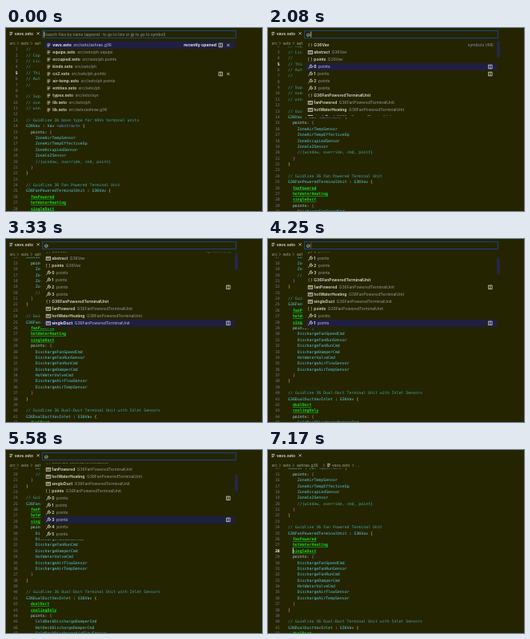
An HTML page that plays this animation: 320 by 229 pixels, repeating every 7330 ms.

```html
<!DOCTYPE html>
<html lang="en">
<head>
<meta charset="utf-8">
<title>Go to symbol</title>
<style>
  html, body { margin: 0; width: 100%; height: 100%; overflow: hidden; background: #242400; }
  svg { display: block; width: 320px; height: 229px; }
  text { white-space: pre; font: 5px Inter, "Open Sans", sans-serif; fill: #dbdbd4; }
  .code text { font: 4.9px "DejaVu Sans Mono", monospace; }
  .code .num { fill: #74748a; text-anchor: end; }
  .code .num.on { fill: #fff; font-weight: bold; }
  .comment { fill: #45a2aa; }
  .type { fill: #55c8dc; }
  .marker { fill: #12df24; font-weight: bold; text-decoration: underline; }
  .key { fill: #a8dcf4; }
  .mod { fill: #5c92e8; }
  .b1 { fill: #f2d51c; }
  .b2 { fill: #d870d6; }
  .crumb { fill: #a3a398; }
  .name { font-weight: 600; }
  .desc { fill: #9898a4; }
  .sel text { fill: #fff; }
  .sel .desc { fill: #c4c4d6; }
  .label { font-size: 5.2px; fill: #9292aa; text-anchor: end; }
  .sel .label { font-weight: 600; }
  .hint { font-size: 4.9px; fill: #9a9a90; }
  .line { fill: none; stroke: #d2d2c8; stroke-width: .8; }
  .chevron { fill: none; stroke: #a3a398; stroke-width: .6; }
</style>
</head>
<body>
<svg id="stage" viewBox="0 0 320 229">
  <defs>
    <clipPath id="codeClip"><path d="M0 22.8H320V229H0z"/></clipPath>
    <clipPath id="listClip"><path d="M46 16.5H290V110H46z"/></clipPath>
  </defs>
  <rect width="320" height="229" fill="#242400"/>
  <g clip-path="url(#codeClip)"><g id="code" class="code"></g></g>
  <g id="tabs"></g>
  <g id="picker">
    <rect id="panel" x="43.2" y="0" width="247" fill="#242400"/>
    <rect x="45.5" y="3.5" width="242" height="9" fill="none" stroke="#1450a0" stroke-width=".8"/>
    <text id="query" x="48" y="9.8"></text>
    <rect id="caret" y="4.5" width=".7" height="7" fill="#eee"/>
    <g clip-path="url(#listClip)"><g id="files"></g><g id="symbols"></g></g>
    <rect id="thumb" x="286" width="4" fill="#26264a"/>
  </g>
</svg>
<script>
const LOOP = 7330, LINE = 7.385, CHAR = 2.95, ROW = 9, FIRST = 21.5, MOUSE = 58;
const LIST_TOP = 16.5, LIST_HEIGHT = 93.5, TOTAL_SYMBOLS = 48;
const $ = id => document.getElementById(id);

function add(parent, tag, attrs = {}, text) {
  const el = document.createElementNS("http://www.w3.org/2000/svg", tag);
  for (const k in attrs) el.setAttribute(k, attrs[k]);
  if (text !== undefined) el.textContent = text;
  parent.appendChild(el);
  return el;
}
const show = (el, on) => { el.style.display = on ? "" : "none"; };

// Editor
const source = `//
// Copyright (c) 2024
// Licensed under the Academic Free License
//
// This file:
// Authors
//

// Supports
// overrides
// windows

// Guidline 36 base type for VAVs terminal units
G36Vav : Vav <abstract> {
  points: {
    ZoneAirTempSensor
    ZoneAirTempEffectiveSp
    ZoneOccupiedSensor
    ZoneCo2Sensor
    //{window, override, cmd, point}
  }
}

// Guidline 36 Fan Powered Terminal Unit
G36FanPoweredTerminalUnit : G36Vav {
  fanPowered
  hotWaterHeating
  singleDuct
  points: {
    DischargeFanSpeedCmd
    DischargeFanRunSensor
    DischargeFanRunCmd
    DischargeDamperCmd
    HotWaterValveCmd
    DischargeAirFlowSensor
    DischargeAirTempSensor
  }
}

// Guidline 36 Dual-Duct Terminal Unit with Inlet Sensors
G36DualDuctVavInlet : G36Vav {
  dualDuct
  coolingOnly
  points: {
    ColdDeckDischargeDamperCmd
    HotDeckDischargeDamperCmd
    ColdDeckDischargeAirFlowSensor
    HotDeckDischargeAirFlowSensor
  }
}`.split("\n");

function kind(token, indent) {
  if (token.startsWith("//")) return "comment";
  if (/^[{}]/.test(token)) return indent ? "b2" : "b1";
  if (token[0] === "<") return "mod";
  if (/^[A-Z]/.test(token)) return "type";
  if (token === "points") return "key";
  return /^[a-z]/.test(token) ? "marker" : "";
}

const nums = source.map((line, i) => {
  const y = 28.2 + i * LINE, indent = line.search(/\S|$/);
  const el = add($("code"), "text", { x: 25 + indent * CHAR, y });
  for (const token of line.trim().match(/\/\/.*|<\w+>|\w+|[^\w]/g) || [])
    add(el, "tspan", { class: kind(token, indent) }, token);
  return add($("code"), "text", { x: 14.8, y, class: "num" }, i + 1);
});
const cursor = add($("code"), "rect",
  { x: 30.8, y: 22.7 + 27 * LINE, width: 1, height: 7.2, fill: "#d8d8d0" });

const centred = line => Math.max(0, (line - 1) * LINE - 99.6);

// Tab and breadcrumb
function fileIcon(parent, x, y) {
  add(parent, "path", { class: "line",
    d: `M${x} ${y - 1.6}h3.8M${x} ${y}h3.8M${x} ${y + 1.6}h2.6` });
}
fileIcon($("tabs"), 4.5, 7);
add($("tabs"), "text", { x: 10.7, y: 8.9, class: "name" }, "vavs.xeto");
add($("tabs"), "path", { class: "line", d: "M38.7 5.3l3 3m0-3l-3 3" });
for (const [x, word] of [[4.5, "src"], [18.5, "xeto"], [36, "ashrae.g36"], [80, "vavs.xeto"], [110, "…"]])
  add($("tabs"), "text", { x, y: 20.8, class: "crumb" }, word);
for (const x of [14, 31, 69, 105.5])
  add($("tabs"), "path", { class: "chevron", d: `M${x} 17.4l1.6 1.7l-1.6 1.7` });
fileIcon($("tabs"), 74, 19);

// Picker rows
const glyph = s => g => add(g, "text", { x: 50, y: 1.7 }, s);
const icons = {
  file: g => fileIcon(g, 51.5, 0),
  object: glyph("{ }"),
  array: glyph("[ ]"),
  marker(g) {
    add(g, "rect", { class: "line", x: 50.2, y: -2, width: 5.4, height: 4 });
    add(g, "path", { class: "line", d: "M51.2 .6h1.2M53.2 .6h1.2M51.2 -.7h3.2" });
  },
  prop(g) {
    add(g, "path", { class: "line", d: "M50.2 2.6L53 -.2M54.4 -2.5a1.8 1.8 0 1 0 1.4 1.8l-1.4 .4l-.7 -.9z" });
  }
};

function makeRow(list, item, i, label) {
  const g = add(list, "g", { transform: `translate(0 ${FIRST + i * ROW})` });
  const back = add(g, "rect", { x: 48, y: -4.5, width: 238, height: ROW, fill: "#1f1f42" });
  icons[item.icon](g);
  const text = add(g, "text", { x: item.icon === "file" ? 58.3 : 57.3, y: 1.8 });
  add(text, "tspan", { class: "name" }, item.name);
  add(text, "tspan", { class: "desc", dx: 2.5 }, item.desc || "");
  const tag = label && add(g, "text", { y: 1.8, class: "label" }, label);
  const tools = add(g, "g");
  const isFile = item.icon === "file", x = isFile ? 266 : 275.5;
  add(tools, "path", { class: "line", d: `M${x} -2.3h4.6v4.6h-4.6zm2.3 0v4.6` });
  if (isFile) add(tools, "path", { class: "line", d: "M276.2 -1.6l3.2 3.2m0-3.2l-3.2 3.2" });
  return (selected, hovered) => {
    g.setAttribute("class", selected ? "sel" : "");
    show(back, selected);
    show(tools, selected || hovered);
    if (tag) tag.setAttribute("x", selected || hovered ? (isFile ? 263 : 272) : 282);
  };
}

const files = ["vavs ashrae.g36", "equips ph.equips", "occupied ph.points", "kinds ph",
  "co2 ph.points", "air-temp ph.points", "entities ph", "types sys", "lib ph", "lib ashrae.g36"]
  .map(s => {
    const [name, dir] = s.split(" ");
    return { icon: "file", name: name + ".xeto", desc: "src/xeto/" + dir };
  });

const symbols = [];
function addType(name, line, markers, markerLine, pointLine, count) {
  symbols.push({ icon: "object", name, line });
  markers.forEach((m, i) =>
    symbols.push({ icon: "marker", name: m, desc: name, line: markerLine + i }));
  symbols.push({ icon: "array", name: "points", desc: name, line: pointLine });
  for (let i = 0; i < count; i++)
    symbols.push({ icon: "prop", name: String(i), desc: "points", line: pointLine + 1 + i });
}
addType("G36Vav", 14, ["abstract"], 14, 15, 4);
addType("G36FanPoweredTerminalUnit", 25, ["fanPowered", "hotWaterHeating", "singleDuct"], 26, 29, 7);

const fileRows = files.map((f, i) => makeRow($("files"), f, i, i ? "" : "recently opened"));
const symbolRows = symbols.map((s, i) =>
  makeRow($("symbols"), s, i, i ? "" : `symbols (${TOTAL_SYMBOLS})`));

function paintRows(rows, selected, scroll) {
  const hovered = Math.round((MOUSE + scroll - FIRST) / ROW);
  rows.forEach((paint, i) => paint(i === selected, i === hovered));
}

const shown = LIST_HEIGHT / (TOTAL_SYMBOLS * ROW);
$("thumb").setAttribute("height", LIST_HEIGHT * shown);

// Key presses: down to row 17, then back up to row 10
const TYPED = 500, LISTED = 580, CLOSED = 7000;
const downs = [1670, 1830, 2000, 2250, 2420, 2670, 2830, 3000, 3080, 3250,
  3750, 3920, 4170, 4330, 4580, 4830, 5000];
const ups = [5420, 5580, 5750, 6000, 6170, 6330, 6580];
const pressed = (keys, t) => keys.filter(k => k <= t).length;

function draw(t) {
  const listed = t >= LISTED, typed = t >= TYPED, closed = t >= CLOSED;
  const lowest = pressed(downs, t), selected = lowest - pressed(ups, t);
  const scroll = Math.max(0, FIRST + lowest * ROW - 105.3);

  $("code").setAttribute("transform",
    `translate(0 ${listed ? -centred(symbols[selected].line) : 0})`);
  nums.forEach((n, i) => n.classList.toggle("on", i === (closed ? 27 : 4)));
  show(cursor, closed);

  show($("picker"), !closed);
  $("panel").setAttribute("height", listed ? 112 : 108.5);
  $("query").textContent = typed ? "@"
    : "Search files by name (append : to go to line or @ to go to symbol)";
  $("query").setAttribute("class", typed ? "" : "hint");
  $("caret").setAttribute("x", typed ? 53.5 : 47.2);
  const beat = t % 1000;
  $("caret").setAttribute("opacity", beat < 250 || beat >= 750 ? 1 : beat < 330 ? .4 : 0);

  show($("files"), !listed);
  show($("symbols"), listed);
  show($("thumb"), listed);
  $("symbols").setAttribute("transform", `translate(0 ${-scroll})`);
  $("thumb").setAttribute("y", LIST_TOP + scroll * shown);
  if (listed) paintRows(symbolRows, selected, scroll);
  else paintRows(fileRows, 0, 0);
}

function tick() {
  draw(performance.now() % LOOP);
  requestAnimationFrame(tick);
}
tick();
</script>
</body>
</html>
```
